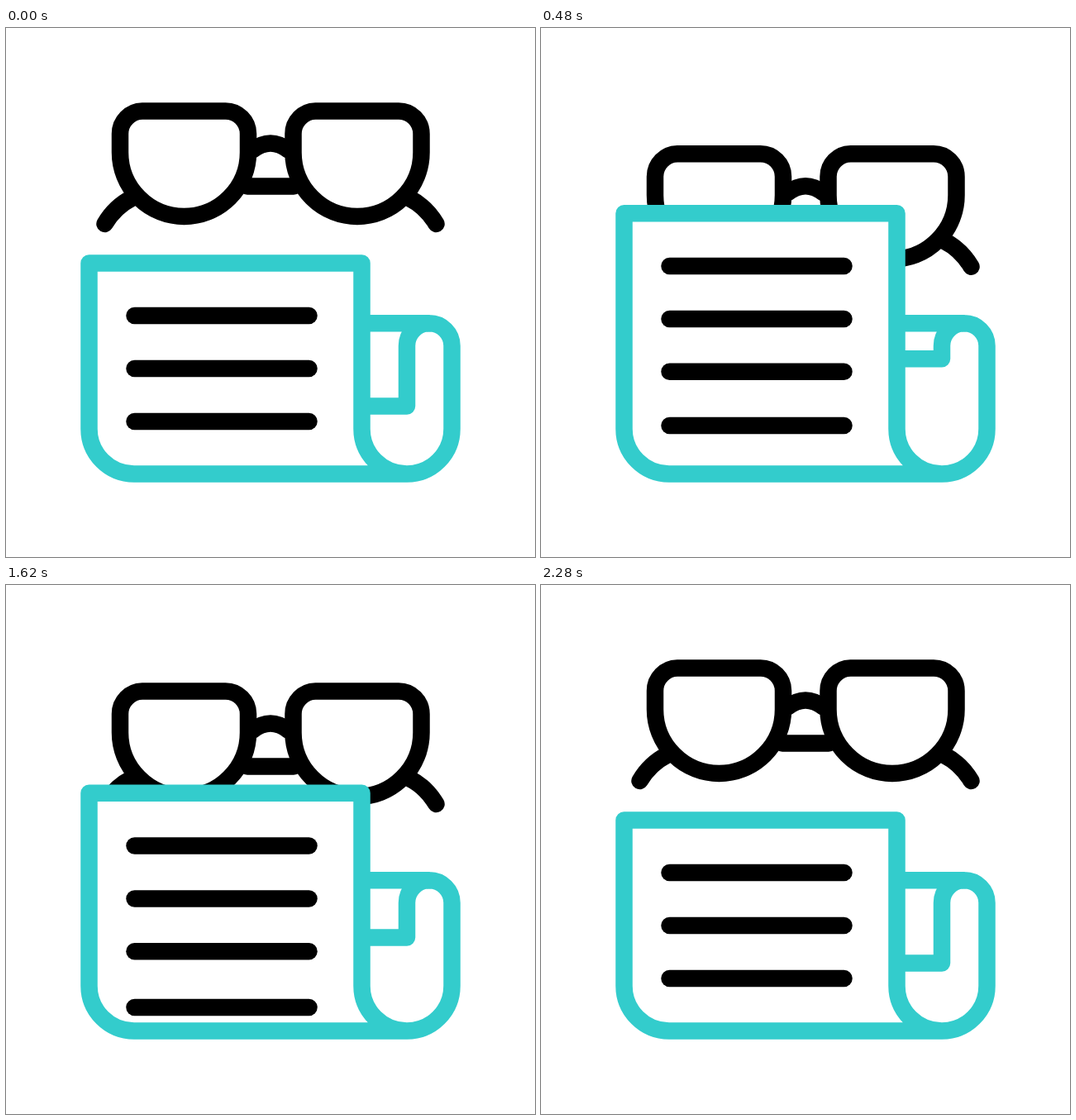
Animation, 640 px wide and 640 px high, one loop 2400 ms. Source, as an HTML page:

```html
<!DOCTYPE html>
<html lang="en">
<head>
<meta charset="utf-8">
<title>Glasses and newspaper</title>
<style>
  html, body { margin: 0; height: 100%; overflow: hidden; background: #fff; }
  svg { display: block; width: 100%; height: 100%; }
  .ink { stroke: #000; }
  .teal { stroke: #3cc; }
</style>
</head>
<body>
<svg viewBox="0 0 640 640" fill="none" stroke-width="20.5" stroke-linecap="round" stroke-linejoin="round">
  <defs>
    <path id="lens" d="M165 100.5H265.5A27.5 27.5 0 0 1 293 128V150.5A77.5 77.5 0 0 1 138 150.5V128A27.5 27.5 0 0 1 165 100.5Z"/>
    <clipPath id="lenses"><use href="#lens"/><use href="#lens" x="209.5"/></clipPath>
    <clipPath id="page"><rect x="100" y="180" width="330" height="360"/></clipPath>
  </defs>
  <g id="glasses">
    <g id="shine" class="teal" clip-path="url(#lenses)"></g>
    <g class="ink">
      <use href="#lens"/><use href="#lens" x="209.5"/>
      <path d="M298 148Q320 131 342 148M292 191.5H348M152 206Q132 216 119.500 237M488 206Q508 216 520.500 237"/>
    </g>
  </g>
  <path id="sheet" fill="#fff"/>
  <g id="text" class="ink" clip-path="url(#page)"></g>
  <path id="outline" class="teal"/>
</svg>
<script>
const $ = id => document.getElementById(id);
const LOOP = 2400, STEP = 20;

// Eased progress from time a to time b
const ease = (t, a, b) => {
  const x = Math.min(1, Math.max(0, (t - a) / (b - a)));
  return x * x * (3 - 2 * x);
};

const addPath = parent => parent.appendChild(
  document.createElementNS("http://www.w3.org/2000/svg", "path"));

// Text lines: resting height and height when the page is raised
const lines = [[348, 271.5], [412, 335.5], [476, 399], [546.5, 463]]
  .map(([low, high]) => ({ low, high, el: addPath($("text")) }));

// Reflections: start and end of each stroke
const glints = [
  [237, 98, 150.5, 202], [172, 226, 273, 103],
  [451, 98, 366, 201], [350, 278, 496, 102]
].map(ends => ({ ends, el: addPath($("shine")) }));

function draw(t) {
  const p = ease(t, 200, 600) - ease(t, 1400, 1800);
  const top = 284.5 - 77 * p, fold = 457.5 - 73 * p;

  $("glasses").setAttribute("transform", `translate(0 ${66 * p})`);

  const page = `M430.5 ${top}H100.5V485A54.5 54.5 0 0 0 155 539.5H485`;
  const side = `A54.5 54.5 0 0 1 430.5 485V${top}`;
  $("sheet").setAttribute("d", page + side + "Z");
  $("outline").setAttribute("d", page + side +
    "M485 539.5A54.5 54.5 0 0 0 539.5 485V384.5A27.3 27.3 0 0 0 512.2 357.2H430.5" +
    `M512.2 357.2A27.3 27.3 0 0 0 485 384.5V${fold}H430.5`);

  for (const { low, high, el } of lines)
    el.setAttribute("d", `M155.5 ${low + (high - low) * p}H366.5`);

  const head = ease(t, 1800, 2040), tail = ease(t, 2040, 2280);
  $("shine").style.display = head > tail ? "" : "none";
  for (const { ends: [x, y, u, v], el } of glints) {
    const at = k => `${x + (u - x) * k} ${y + (v - y) * k}`;
    el.setAttribute("d", `M${at(tail)}L${at(head)}`);
  }
}

const begin = performance.now();
function tick() {
  const t = (performance.now() - begin) % LOOP;
  draw(Math.floor(t / STEP) * STEP);
  requestAnimationFrame(tick);
}
tick();
</script>
</body>
</html>
```
